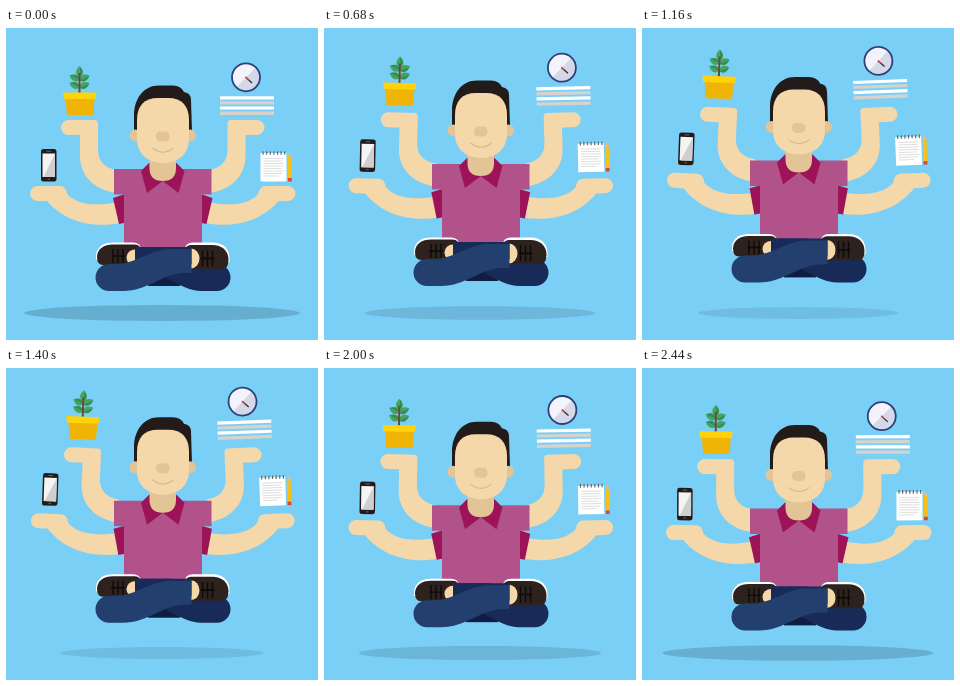
These frames come from a looping animation (312 by 312 pixels, 2.52 s). An HTML page:

```html
<!DOCTYPE html>
<html lang="en">
<head>
<meta charset="utf-8">
<title>Floating multitasker</title>
<style>
  html, body { margin: 0; height: 100%; overflow: hidden; background: #7acff7; }
  svg { display: block; width: 100%; height: 100%; }
  .skin { fill: #f4d8a9; }
  .shade { fill: #e2c496; }
  .shirt { fill: #b2528b; }
  .maroon { fill: #9c1457; }
  .dark { fill: #231b1a; }
  .white { fill: #fff; }
  .grey { fill: #d6d2cc; }
</style>
</head>
<body>
<svg viewBox="0 0 312 312">
  <defs>
    <g id="leaf">
      <path d="M0 0C-5-3-4-7 0-11z" fill="#45a35c"/>
      <path d="M0 0C5-3 4-7 0-11z" fill="#33904f"/>
    </g>
    <g id="shoe">
      <path class="white" d="M90 231C89 220 96 214.500 107 214.500H127Q134 214.500 135 221L92 233z"/>
      <path d="M91 229C91 221 98 216.500 107 216.500H129Q135 217 135 223V237H97Q91 237 91 229z" fill="#2d221e"/>
      <path d="M107 221v14M112 221v14M117 221v14M105 228h14" stroke="#0e0a09" stroke-width="1.4"/>
    </g>
  </defs>

  <ellipse id="shadow" cx="156" cy="285"/>

  <g id="body">
    <g id="arms">
      <g id="upperArm">
        <path class="skin" d="M62.5 92H88.5Q92 92 92 96V122C92 133 99 141 112 142V165C90 163 74 149 74 128V107H62.5A7.5 7.5 0 0 1 62.5 92z"/>
      </g>
      <g id="lowerArm">
        <path class="skin" d="M31.5 158H54Q60 158 61.5 166.500C70 175 84 179 110 174.500L115 195C88 200 60 195 41 173H31.5A7.5 7.5 0 0 1 31.5 158z"/>
        <path class="maroon" d="M107 170L122 165V194L113 196z"/>
      </g>
    </g>
    <use href="#arms" transform="matrix(-1 0 0 1 313.5 0)"/>

    <path class="shirt" d="M108 141H205.500V166.500H196V220H118V166.500H108z"/>
    <path class="maroon" d="M143 135L135 143L141 165L156.800 153L172.500 165L178.500 143L170.500 135z"/>
    <path class="shade" d="M143.500 128H170V140Q170 153 156.800 153Q143.500 153 143.500 140z"/>

    <path class="dark" d="M128 104V88C128 71 137 57.500 153 57.500H167Q175 57.500 178 64Q185 65 185 72L186 104z"/>
    <circle class="shade" cx="129.500" cy="107.500" r="6"/>
    <circle class="shade" cx="184" cy="107.500" r="6"/>
    <path class="skin" d="M131 92C131 78 138 70 152 70H162C176 70 183 78 183 92V111C183 126 172 135 157 135S131 126 131 111z"/>
    <rect class="shade" x="150" y="103.500" width="13.500" height="10" rx="4.500"/>
    <path d="M146.500 120Q157 128.500 167.500 120" fill="none" stroke="#dbb987" stroke-width="1.100"/>

    <path d="M142 240H174V258H142z" fill="#101d40"/>
    <use href="#shoe"/>
    <ellipse class="skin" cx="129" cy="229.500" rx="8.500" ry="8"/>
    <path d="M129 219H165C180 222 186 236 200 236H211A13.500 13.500 0 0 1 211 263H195C175 263 152 241 129 236z" fill="#182b58"/>
    <use href="#shoe" transform="matrix(-1 0 0 1.17 313.500 -36.400)"/>
    <ellipse class="skin" cx="185" cy="230.500" rx="8.500" ry="10"/>
    <path d="M129 219H185.500V236H129z" fill="#182b58"/>
    <path d="M103 236H110C130 236 142 222 164 221H185.500V245H178C155 246 142 263 117 263H103A13.500 13.500 0 0 1 103 236z" fill="#223f6d"/>
  </g>

  <g id="plant">
    <use href="#leaf" transform="translate(73.500 49)"/>
    <use href="#leaf" transform="translate(73.500 52) rotate(-66)"/>
    <use href="#leaf" transform="translate(73.500 52) rotate(66)"/>
    <use href="#leaf" transform="translate(73.500 59.500) rotate(-66)"/>
    <use href="#leaf" transform="translate(73.500 59.500) rotate(66)"/>
    <path d="M73.500 45V65" stroke="#6b4a2e" stroke-width="2"/>
    <path d="M59.500 70H88.500L87.500 87H61z" fill="#efb406"/>
    <path d="M57 64.500H90.500L89.500 71H58z" fill="#ffd20a"/>
  </g>

  <g id="phone">
    <rect class="dark" x="35" y="121" width="15.500" height="32.500" rx="2.500"/>
    <path d="M36.500 125.500h12.500v23.500h-12.500z" fill="#f4f4f4"/>
    <path d="M49 125.500V149H37.500z" fill="#cfcfd1"/>
    <path d="M40.500 123.300h4.500M41.500 151.200h2.500" stroke="#777" stroke-width=".8"/>
  </g>

  <g id="desk">
    <path class="white" d="M214 68.300h54v3.200h-54zM214 78.400h54v3.200h-54z"/>
    <path class="grey" d="M214 73.300h54v3.200h-54zM214 83.600h54v3.300h-54z"/>
    <circle cx="240" cy="49.300" r="14" fill="#f3f4fb"/>
    <path d="M249.900 39.400A14 14 0 0 1 230.100 59.200z" fill="#d5d8e8"/>
    <circle cx="240" cy="49.300" r="14" fill="none" stroke="#2d4178" stroke-width="1.800"/>
    <path d="M239.500 49L246 55" stroke="#2a2a3a" stroke-width="1.300"/>
    <path d="M239.500 49L242.500 51.800" stroke="#d8463c" stroke-width="1.300"/>
  </g>

  <g id="notes">
    <path class="white" d="M254.500 125h26v28.500h-26z"/>
    <path d="M257.500 130.500h20M257.500 133h19M257.500 135.500h20M257.500 138h20M257.500 140.500h18M257.500 143h20M257.500 145.500h19M257.500 148h15" stroke="#d6d6d6" stroke-width=".8"/>
    <path d="M256.500 125h23" stroke="#6b6560" stroke-width="3.600" stroke-dasharray="1.200 2.400"/>
    <path d="M282 129L283.900 124L285.800 129z" fill="#e8b98a"/>
    <path d="M282 128.500h3.800V150H282z" fill="#f8bf16"/>
    <path d="M282 150h3.800v3.500H282z" fill="#d9453f"/>
  </g>
</svg>
<script>
  const LOOP = 2520;
  const el = id => document.getElementById(id);
  const set = (id, attrs) => {
    for (const name in attrs) el(id).setAttribute(name, attrs[name]);
  };
  const items = [
    { id: 'plant', side: 1, drift: 3.2, x: 73.5, y: 76 },
    { id: 'phone', side: 1, drift: 1.7, x: 43, y: 137 },
    { id: 'desk', side: -1, drift: 2.8, x: 241, y: 77 },
    { id: 'notes', side: -1, drift: 1, x: 270, y: 138 },
  ];

  function draw(now) {
    // Height rises linearly to 1 at mid-loop, then falls back to 0.
    const lift = 1 - Math.abs(1 - 2 * (now % LOOP) / LOOP);
    set('shadow', { rx: 138 - 41 * lift, ry: 8 - 2.2 * lift, 'fill-opacity': 0.16 - 0.08 * lift });
    set('body', { transform: `translate(0 ${-9.3 * lift})` });
    set('upperArm', { transform: `rotate(${3 * lift} 160 160)` });
    set('lowerArm', { transform: `rotate(${3 * lift} 130 182)` });
    for (const { id, side, drift, x, y } of items) {
      set(id, { transform: `translate(${side * drift * lift} ${-17.8 * lift}) rotate(${side * 2.3 * lift} ${x} ${y})` });
    }
  }

  const start = performance.now();
  function tick() {
    draw(performance.now() - start);
    requestAnimationFrame(tick);
  }
  tick();
</script>
</body>
</html>
```
